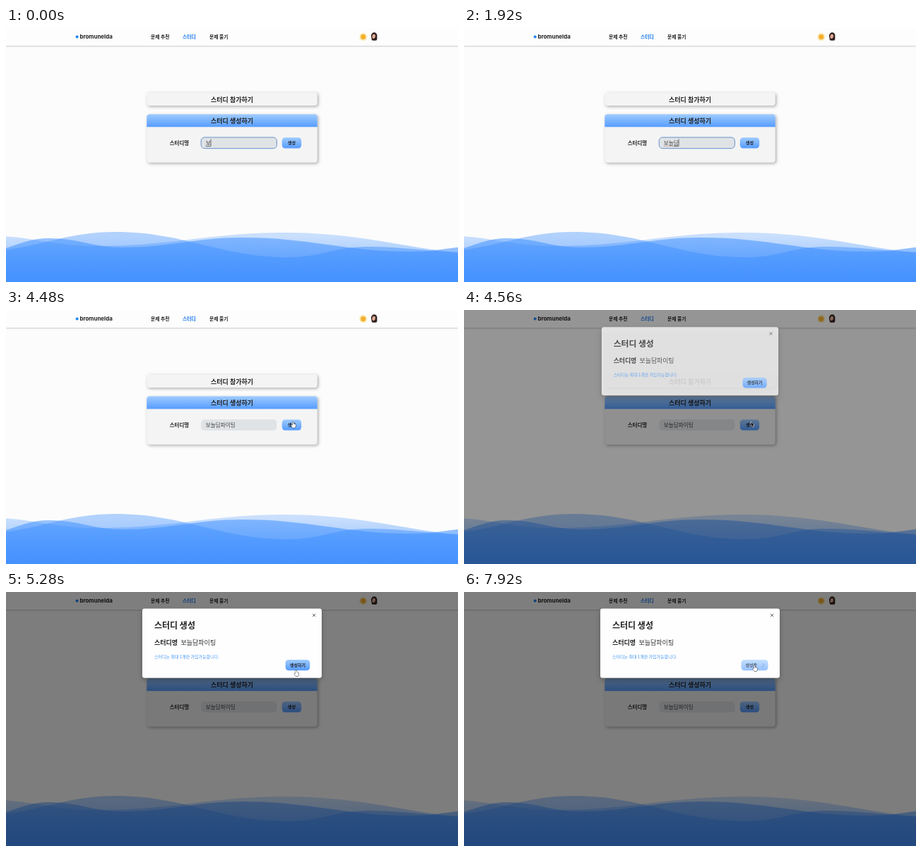
These frames come from a looping animation (640x360 px, 8 s). An HTML page with a canvas:

```html
<!DOCTYPE html>
<html lang="ko">
<head>
<meta charset="utf-8">
<style>
html, body { margin: 0; width: 100%; height: 100%; overflow: hidden; background: #fcfcfc; }
canvas { display: block; width: 100vw; height: 100vh; }
</style>
</head>
<body>
<canvas id="stage"></canvas>
<script>
const LOOP = 8000, STEP = 80, W = 640, H = 360;
const KR = '"Noto Sans CJK KR", "Noto Sans CJK JP", "Noto Sans CJK", sans-serif';
const canvas = document.getElementById('stage');
const ctx = canvas.getContext('2d');
const scale = Math.max(1, window.devicePixelRatio || 1);
canvas.width = W * scale;
canvas.height = H * scale;

const STUDY = '보늘담파이팅';
const RESUME = 2960, BLUR = 4480, OPEN = 4560, SUBMIT = 5760;
const INITIALS = 'ㄱㄲㄴㄷㄸㄹㅁㅂㅃㅅㅆㅇㅈㅉㅊㅋㅌㅍㅎ';

const clamp = v => Math.min(1, Math.max(0, v));
const mix = (a, b, k) => a + (b - a) * k;

// Every state of the field while the word is composed letter by letter.
function keystrokes(word) {
  const states = [];
  [...word].forEach((syllable, i) => {
    const done = word.slice(0, i);
    const code = syllable.charCodeAt(0) - 0xAC00;
    const final = code % 28;
    states.push(done + INITIALS[Math.floor(code / 588)]);
    states.push(done + String.fromCharCode(0xAC00 + code - final));
    if (final) states.push(done + syllable);
  });
  return states;
}

const STATES = keystrokes(STUDY);
const PAUSE = STATES.indexOf(STUDY.slice(0, 3));

function typedAt(t) {
  const i = t < RESUME
    ? Math.min(PAUSE, 1 + Math.floor(t / 200))
    : PAUSE + 1 + Math.floor((t - RESUME) / 130);
  return STATES[Math.min(i, STATES.length - 1)];
}

function text(str, x, yMid, size, { bold = false, color = '#222', align = 'left', font = KR } = {}) {
  ctx.font = `${bold ? 700 : 400} ${size}px ${font}`;
  ctx.fillStyle = color;
  ctx.textAlign = align;
  ctx.fillText(str, x, yMid + size * 0.38);
}

function box(x, y, w, h, r, fill, stroke) {
  ctx.beginPath();
  ctx.roundRect(x, y, w, h, r);
  ctx.fillStyle = fill;
  ctx.fill();
  if (stroke) {
    ctx.strokeStyle = stroke;
    ctx.lineWidth = 1;
    ctx.stroke();
  }
}

function raised(x, y, w, h, r, fill, alpha, blur, dx, dy) {
  ctx.save();
  ctx.shadowColor = `rgba(0,0,0,${alpha})`;
  ctx.shadowBlur = blur * scale;
  ctx.shadowOffsetX = dx * scale;
  ctx.shadowOffsetY = dy * scale;
  box(x, y, w, h, r, fill);
  ctx.restore();
}

function fade(y0, y1, c0, c1) {
  const g = ctx.createLinearGradient(0, y0, 0, y1);
  g.addColorStop(0, c0);
  g.addColorStop(1, c1);
  return g;
}

const blue = (y, h) => fade(y, y + h, '#a0ccff', '#579dff');

function disc(x, y, r, fill) {
  ctx.beginPath();
  ctx.arc(x, y, r, 0, Math.PI * 2);
  ctx.fillStyle = fill;
  ctx.fill();
}

// Joins crests and troughs with level tangents and fills down to the stage bottom.
function wave(alpha, ...turns) {
  ctx.beginPath();
  ctx.moveTo(0, H);
  turns.forEach(([x, y], i) => {
    if (!i) return ctx.lineTo(x, y);
    const [px, py] = turns[i - 1];
    ctx.bezierCurveTo(mix(px, x, 0.4), py, mix(px, x, 0.6), y, x, y);
  });
  ctx.lineTo(W, H);
  ctx.fillStyle = fade(295, H, `rgba(66,146,255,${alpha})`, 'rgba(62,142,255,.68)');
  ctx.fill();
}

function waves() {
  wave(0.27, [-30, 294], [130, 309], [395, 290], [720, 323]);
  wave(0.4, [-40, 317], [155, 289], [401, 325], [510, 310], [660, 318]);
  wave(0.53, [-40, 319], [61, 298], [165, 311], [335, 297], [575, 317], [670, 309]);
}

function sun(x, y) {
  for (let i = 0; i < 10; i++) {
    const a = i * Math.PI / 5;
    disc(x + Math.cos(a) * 4.5, y + Math.sin(a) * 4.5, 1.2, '#fbe2a2');
  }
  disc(x, y, 3.6, '#f4b02c');
}

function oval(x, y, rx, ry, tilt, fill) {
  ctx.beginPath();
  ctx.ellipse(x, y, rx, ry, tilt, 0, Math.PI * 2);
  ctx.fillStyle = fill;
  ctx.fill();
}

function avatar() {
  oval(521.2, 11.2, 4.3, 4.9, 0.1, '#33221f');
  box(517.6, 11, 7.8, 6.8, 2, '#33221f');
  oval(520.7, 11.9, 2.3, 3.2, 0.15, '#e2ac97');
}

function header() {
  raised(0, 0, W, 25, 0, '#fdfdfd', 0.2, 2, 0, 0.5);
  disc(100.6, 12.6, 2, '#1f83f5');
  text('bromunelda', 104.5, 12.3, 7.9, { bold: true, font: 'Inter, sans-serif' });
  text('문제 추천', 205, 12.6, 6.75, { bold: true });
  text('스터디', 250, 12.6, 6.75, { bold: true, color: '#1474ee' });
  text('문제 풀기', 288, 12.6, 6.75, { bold: true });
  sun(505.8, 12.6);
  avatar();
}

function field(t) {
  const focused = t < BLUR, left = 282.7;
  box(276.2, 155, 107.2, 15.7, 5, '#e0e3e6', focused ? '#6591ca' : null);
  const typed = typedAt(t);
  text(typed, left, 163, 7.6, { color: '#444' });
  if (!focused) return;
  const end = left + ctx.measureText(typed).width;
  const start = left + ctx.measureText(typed.slice(0, -1)).width;
  ctx.fillStyle = '#333';
  ctx.fillRect(start, 167.4, end - start, 0.7);
  if (t < 2400 || (t >= 2800 && t < 3840)) ctx.fillRect(end, 157.5, 0.7, 10);
  if (t >= 1680 && t < 2400) {
    ctx.fillStyle = '#c0705c';
    for (let x = left; x < start; x += 1.8) ctx.fillRect(x, 167.4, 1, 0.8);
  }
}

function panel(y, h) {
  raised(199.3, y, 241.5, h, 4, '#f4f4f4', 0.32, 4, 1.5, 1.5);
}

function panels(t) {
  panel(91.3, 18.7);
  text('스터디 참가하기', 320, 101.5, 9, { bold: true, align: 'center' });
  panel(122.2, 68.5);
  box(199.3, 122.2, 241.5, 18, [4, 4, 0, 0], blue(122, 18));
  text('스터디 생성하기', 320, 132, 9, { bold: true, align: 'center' });
  text('스터디명', 231.7, 163, 7.45, { bold: true });
  field(t);
  box(390.8, 155.3, 27.4, 15.2, 4.5, blue(155, 15));
  text('생성', 404.5, 163, 6, { bold: true, align: 'center' });
}

function submitButton(t) {
  if (t < SUBMIT) {
    box(395.7, 96, 34.6, 15.2, 4.5, blue(96, 15));
    text('생성하기', 413, 103.7, 6, { bold: true, align: 'center' });
    return;
  }
  ctx.save();
  ctx.globalAlpha = 0.62;
  box(392.5, 96, 38, 15.2, 4.5, blue(96, 15));
  text('생성중', 398.5, 103.7, 6, { bold: true });
  const turn = (t - 6320) / 450 * Math.PI * 2;
  ctx.beginPath();
  ctx.arc(421.3, 103.7, 3, turn + Math.PI * 0.58, turn + Math.PI * 1.42);
  ctx.strokeStyle = '#6d8fbd';
  ctx.lineWidth = 0.9;
  ctx.stroke();
  ctx.restore();
}

function modal(t) {
  if (t < OPEN) return;
  const p = clamp(0.7 + (t - OPEN) / 200);
  const size = mix(0.95, 1, p);
  ctx.fillStyle = `rgba(0,0,0,${mix(0.2, 0.5, p)})`;
  ctx.fillRect(0, 0, W, H);
  ctx.save();
  ctx.translate(320, 72.8);
  ctx.scale(size, size);
  ctx.translate(-320, -72.8);
  ctx.globalAlpha = mix(0.27, 1, p);
  raised(193, 23.6, 254, 98.2, 3, '#fefefe', 0.25, 7, 0, 3);
  ctx.strokeStyle = '#333';
  ctx.lineWidth = 0.8;
  ctx.beginPath();
  for (const d of [-2, 2]) {
    ctx.moveTo(434.2, 32.9 - d);
    ctx.lineTo(438.2, 32.9 + d);
  }
  ctx.stroke();
  text('스터디 생성', 210, 47, 12, { bold: true });
  text('스터디명', 210, 72, 9, { bold: true });
  text(STUDY, 247.5, 72, 9, { color: '#333' });
  text('스터디는 최대 1개만 가입가능합니다.', 210, 92, 6, { color: '#3f93f6' });
  submitButton(t);
  ctx.restore();
}

function shape(path, fill, stroke) {
  const p = new Path2D(path);
  ctx.lineJoin = 'round';
  ctx.lineWidth = 0.9;
  ctx.strokeStyle = stroke;
  ctx.stroke(p);
  ctx.fillStyle = fill;
  ctx.fill(p);
}

function pointer(t) {
  if (t < 3760) return;
  const toCreate = clamp((t - 3680) / 640) ** 2;
  const toSubmit = clamp((t - 4720) / 640);
  ctx.save();
  ctx.translate(mix(mix(480, 406.5, toCreate), 411.5, toSubmit),
    mix(mix(142.5, 158.5, toCreate), 104, toSubmit));
  const hand = (t >= 4240 && t < OPEN) || t >= 5200;
  if (hand) shape('M-.7 0H.5L.8 3 3.4 3.6 3.7 5.5 2.8 8.3H-.6L-2.8 5.2-2.1 4.3-.8 5.2Z', '#fff', '#222');
  else shape('M0 0V6.4L1.4 5.1 2.5 7.6 3.5 7.2 2.4 4.8 4.4 4.7Z', '#111', '#fff');
  ctx.restore();
}

function draw(now) {
  const t = Math.floor((now % LOOP) / STEP) * STEP;
  ctx.setTransform(scale, 0, 0, scale, 0, 0);
  ctx.fillStyle = '#fcfcfc';
  ctx.fillRect(0, 0, W, H);
  waves();
  header();
  panels(t);
  modal(t);
  pointer(t);
}

let begin = null;
function tick(now) {
  if (begin === null) begin = now;
  draw(Math.max(0, now - begin));
  requestAnimationFrame(tick);
}
draw(0);
requestAnimationFrame(tick);
</script>
</body>
</html>
```
